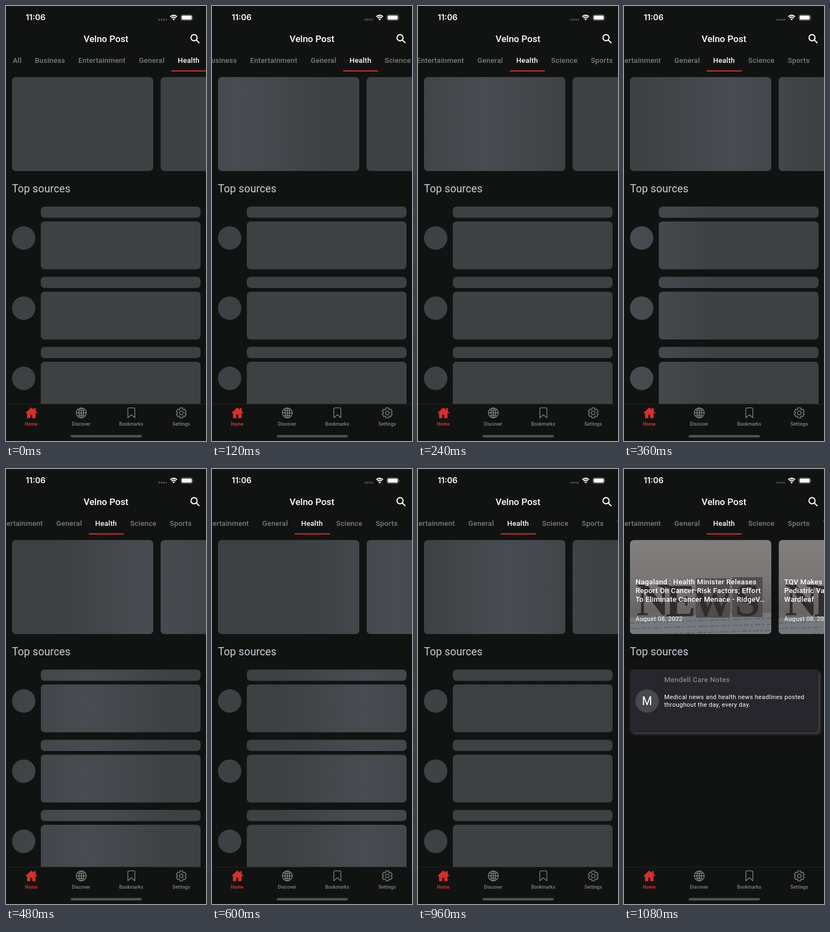
An HTML page for the animation above (1200 ms loop, 368 by 796 pixels).

```html
<!DOCTYPE html>
<html lang="en">
<head>
<meta charset="utf-8">
<title>News app loading</title>
<style>
  html, body { margin: 0; width: 100%; height: 100%; overflow: hidden; background: #111312; }
  svg { display: block; width: 368px; height: 796px; font-family: Roboto, sans-serif; }
  .body { font-size: 13.21px; font-weight: 500; letter-spacing: .24px; }
  .small { font-size: 11.32px; letter-spacing: .34px; }
  .nav { font-size: 8.5px; letter-spacing: .1px; text-anchor: middle; }
  .line { fill: none; stroke: #858787; stroke-width: 1.3; stroke-linejoin: round; stroke-linecap: round; }
</style>
</head>
<body>
<svg viewBox="0 0 368 796" xmlns="http://www.w3.org/2000/svg">
  <defs>
    <linearGradient id="heroShine" gradientUnits="userSpaceOnUse" x1="-166" x2="166" y1="0" y2="0">
      <stop offset="0" stop-color="#3e4143"/><stop offset=".5" stop-color="#484b51"/><stop offset="1" stop-color="#3e4143"/>
    </linearGradient>
    <linearGradient id="listShine" gradientUnits="userSpaceOnUse" x1="-156" x2="156" y1="0" y2="0">
      <stop offset="0" stop-color="#3e4143"/><stop offset=".5" stop-color="#484b51"/><stop offset="1" stop-color="#3e4143"/>
    </linearGradient>
    <linearGradient id="wall" x2="0" y2="1">
      <stop offset="0" stop-color="#817f7e"/><stop offset=".45" stop-color="#787574"/>
      <stop offset=".75" stop-color="#656363"/><stop offset="1" stop-color="#77787b"/>
    </linearGradient>
    <filter id="soft" x="-10%" y="-20%" width="120%" height="140%"><feGaussianBlur stdDeviation="2.5"/></filter>
    <clipPath id="cardClip"><rect width="260" height="172" rx="7"/></clipPath>
    <g id="photo" clip-path="url(#cardClip)">
      <rect width="260" height="172" fill="url(#wall)"/>
      <path d="M0 143L260 133V172H0Z" fill="#77797e"/>
      <path d="M0 152L260 143M0 162L260 154M60 172L260 165" stroke="#5b6070" stroke-width="2" stroke-dasharray="9 3 4 5"/>
      <path d="M121 70H184V142H121ZM188 68H244V141H188Z" fill="#514d4c"/>
      <g font-family="'Liberation Serif', serif" font-weight="700" font-size="84" text-anchor="middle" fill="#2f2c2b">
        <text x="42" y="138">N</text><text x="93" y="140">E</text>
        <text x="152" y="139" font-size="70">W</text><text x="216" y="139">S</text>
      </g>
    </g>
  </defs>
  <rect width="368" height="796" fill="#111312"/>

  <text x="54.5" y="26.3" text-anchor="middle" font-family="Inter, sans-serif" font-weight="600" font-size="14.8" fill="#fff">11:06</text>
  <path d="M280.5 25H296" stroke="#515353" stroke-width="3" stroke-dasharray="3 1.4"/>
  <g fill="none" stroke="#fff" stroke-width="2.1">
    <path d="M302.4 19.6Q308.5 14.2 314.6 19.6M304.6 22Q308.5 18.6 312.4 22"/>
    <path d="M306.2 23.9Q308.5 22 310.8 23.9L308.5 26.5Z" fill="#fff" stroke="none"/>
  </g>
  <rect x="321.8" y="16.2" width="21.4" height="10.2" rx="3.2" fill="none" stroke="#777979"/>
  <rect x="323.2" y="17.6" width="18.6" height="7.4" rx="2" fill="#fff"/>
  <path d="M344.4 19.7Q346 21.3 344.4 22.9Z" fill="#777979"/>

  <text x="184" y="65.7" text-anchor="middle" font-size="17.05" font-weight="500" fill="#fff">Velno Post</text>
  <g fill="none" stroke="#fff" stroke-width="2.1"><circle cx="346" cy="58" r="5.6"/><path d="M350 62L355.8 67.8"/></g>

  <g id="tabs" class="body"></g>

  <g id="skeleton"></g>

  <g id="loaded">
    <g id="heroes"></g>
    <rect x="14" y="370" width="347" height="115" rx="7" fill="#46454b" filter="url(#soft)"/>
    <rect x="11" y="367" width="347" height="115" rx="7" fill="#27262d"/>
    <circle cx="42.5" cy="424.5" r="21.5" fill="#46494d"/>
    <text x="42.5" y="432" text-anchor="middle" font-size="21.5" fill="#fff">M</text>
    <text class="body" x="74" y="390" fill="#858488">Mendell Care Notes</text>
    <g class="small" fill="#fff">
      <text x="74" y="421">Medical news and health news headlines posted</text>
      <text x="74" y="435.4">throughout the day, every day.</text>
    </g>
  </g>

  <text x="11" y="341.3" font-size="19.5" letter-spacing=".1" fill="#c4ced6">Top sources</text>

  <rect y="728" width="368" height="68" fill="#111312"/>
  <path d="M0 728.5H368" stroke="#202322"/>
  <path d="M46.5 735L36 744.8H39V754H44.3V747.5H48.7V754H54V744.8H57.8L54.4 741.6V736.2H51.6V739.3Z" fill="#da2f2b" stroke="#da2f2b" stroke-width=".7" stroke-linejoin="round"/>
  <g class="line">
    <circle cx="138.5" cy="744.5" r="9.2"/><ellipse cx="138.5" cy="744.5" rx="4.3" ry="9.2"/>
    <path d="M138.5 735.3V753.7M129.3 744.5H147.7M131.6 739Q138.5 742.4 145.4 739M131.6 750Q138.5 746.6 145.4 750"/>
    <path d="M224.3 753.6V737.4Q224.3 735.4 226.3 735.4H235.1Q237.1 735.4 237.1 737.4V753.6L230.7 748Z"/>
    <path id="gear"/><circle cx="322.5" cy="744.5" r="3.3"/>
  </g>
  <g class="nav" font-weight="500" fill="#858787">
    <text x="46.3" y="768" font-weight="700" fill="#da2f2b">Home</text>
    <text x="138.3" y="768">Discover</text>
    <text x="230.3" y="768">Bookmarks</text>
    <text x="322.3" y="768">Settings</text>
  </g>
  <rect x="119" y="785" width="131" height="4.6" rx="2.3" fill="#505252"/>
</svg>
<script>
const $ = id => document.getElementById(id);
const LOOP = 1200, STEP = 120;

const tabs = [["All", 12.5], ["Business", 53], ["Entertainment", 133], ["General", 244.6],
  ["Health", 316], ["Science", 380.4], ["Sports", 453.2], ["Technology", 518]];
$("tabs").innerHTML = tabs.map(([name, x]) =>
  `<text id="${name}" x="${x}" y="104" fill="${name === "Health" ? "#fff" : "#7b7d7d"}">${name}</text>`).join("") +
  '<rect x="304.3" y="117.7" width="64.4" height="2.2" fill="#cf302c"/>';

const box = (x, y, w, h, fill) =>
  `<rect x="${x}" y="${y}" width="${w}" height="${h}" rx="7" fill="url(#${fill})"/>`;
const row = y => `<circle cx="32.5" cy="${y + 57.5}" r="21.5" fill="url(#listShine)"/>` +
  box(64, y, 294, 20.5, "listShine") + box(64, y + 27.3, 294, 87.5, "listShine");
$("skeleton").innerHTML = box(11, 130, 260, 172, "heroShine") + box(284.5, 130, 260, 172, "heroShine") +
  [0, 1, 2].map(i => row(367 + i * 128.4)).join("");

const hero = (x, lines) => `<g transform="translate(${x} 130)" fill="#fff"><use href="#photo"/>` +
  lines.map((s, i) => `<text class="body" x="10.3" y="${81 + i * 16.2}">${s}</text>`).join("") +
  '<text class="small" x="10.3" y="148">August 08, 2022</text></g>';
$("heroes").innerHTML =
  hero(11, ["Nagaland : Health Minister Releases", "Report On Cancer-Risk Factors; Effort", "To Eliminate Cancer Menace - RidgeV…"]) +
  hero(284.5, ["TQV Makes", "Pediatric Vaccine", "Wardleaf"]);

// Six teeth, four corners each
const corners = [[-17, 9.5], [17, 9.5], [22, 7.2], [38, 7.2]];
$("gear").setAttribute("d", "M" + Array.from({ length: 24 }, (_, i) => {
  const [deg, r] = corners[i % 4];
  const a = (Math.floor(i / 4) * 60 + deg - 90) * Math.PI / 180;
  return (322.5 + r * Math.cos(a)).toFixed(2) + " " + (744.5 + r * Math.sin(a)).toFixed(2);
}).join("L") + "Z");

const moveShine = (id, x) => $(id).setAttribute("gradientTransform", `translate(${x} 0)`);
const show = (id, on) => $(id).setAttribute("visibility", on ? "visible" : "hidden");

function draw(time) {
  const t = Math.floor(time % LOOP / STEP) * STEP;
  const scroll = [0, .414, .89, 1][Math.min(3, t / STEP)];
  $("tabs").setAttribute("transform", `translate(${-152 * scroll} 0)`);

  // The shimmer sweeps right, rests, then starts its next pass
  const sweep = Math.min(t, 600), again = t >= 960;
  moveShine("heroShine", t === 0 ? -400 : again ? 170 : 50 + (sweep - 120) * .604);
  moveShine("listShine", again ? -120 : -255 + (sweep - 120) * 1.125);

  show("Technology", again);
  show("skeleton", t < 1080);
  show("loaded", t >= 1080);
}

const start = performance.now();
function tick() {
  draw(performance.now() - start);
  requestAnimationFrame(tick);
}
tick();
</script>
</body>
</html>
```
